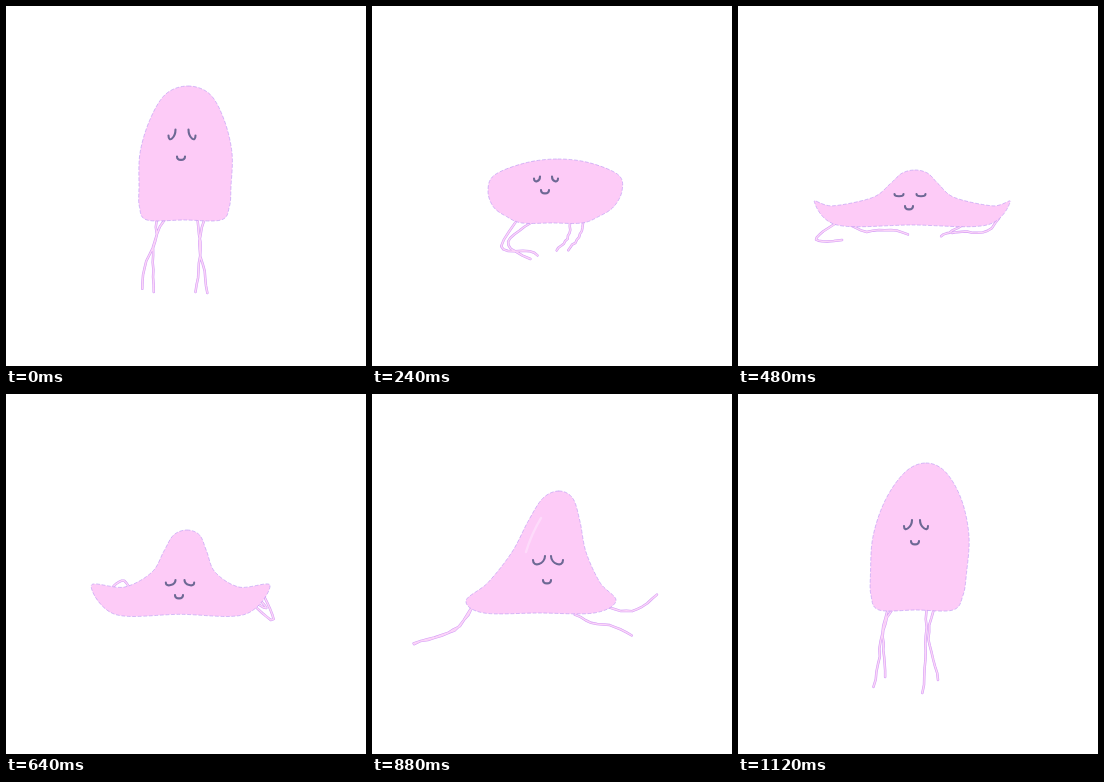
Write an HTML page that moves like this. It is 360 px wide and 360 px high and loops after 1.2 s.

```html
<!DOCTYPE html>
<html lang="en">
<head>
<meta charset="utf-8">
<title>Jelly hop</title>
<style>
  html, body { margin: 0; width: 100%; height: 100%; overflow: hidden; background: #fff; }
  svg { display: block; width: 100vw; height: 100vh; }
  path { fill: none; stroke-linecap: round; stroke-linejoin: round; }
  #body { fill: #fdcbf7; stroke: #b795f3; stroke-width: .6; stroke-dasharray: 3 2.5; }
  #legEdge { stroke: #d29df6; stroke-width: 2.5; }
  #legCore { stroke: #fcd5f8; stroke-width: 1.4; }
  #face { stroke: #6d6894; stroke-width: 2.1; }
  #shine { stroke: #fddbfa; stroke-width: 2.4; }
</style>
</head>
<body>
<svg viewBox="0 0 360 360">
  <path id="legEdge"/>
  <path id="legCore"/>
  <path id="body"/>
  <path id="shine" d="M154 158Q159 141 169 124"/>
  <path id="face"/>
</svg>
<script>
const STEP = 80, COUNT = 15, SHINE_STEP = 11;
const LEVELS = [.06, .25, .5, .75, .9, 1];   // heights at which the half widths are given
const LIFT = [0, 0, 0, .3, 1, 0];            // how far a raised fin pulls each level up
const LEG_PARTS = 10;

// crown and base: [x, y]. Leg: root x, y, tip x, y, bend, wave.
// face: x, y, half eye gap, eye width, eye depth, eye tilt, mouth drop.
const poses = [
  { step: 0, crown: [182, 80], base: [178, 214], fin: 0, half: [22, 37, 46, 46, 45, 37],
    legs: [[150, 214, 137, 283, 0, -3], [158, 214, 148, 286, 6, 1],
           [191, 214, 189, 286, -4, 0], [199, 214, 201, 287, 5, 2]],
    face: [176, 126.5, 10, 7, 8, 6, 24] },
  { step: 2, crown: [184, 132], base: [174, 216], fin: 0, half: [42, 56, 57, 52, 47, 42],
    legs: [[144, 214, 131, 252, 2, 14], [156, 214, 162, 252, 9, 0],
           [190, 217, 178, 248, -9, 0], [201, 217, 209, 252, 5, 7]],
    face: [176, 150, 12, 7, 5, 6, 20] },
  { step: 3, crown: [186, 153], base: [180, 217], fin: 0, half: [32, 62, 67, 60, 46, 30],
    legs: [[144, 216, 166, 249, 22, 8], [158, 217, 159, 253, 22, -2],
           [198, 217, 184, 244, -5, 0], [212, 215, 196, 244, -3, 0]],
    face: [174, 171.5, 9, 6, 5, 2, 12.5] },
  { step: 6, crown: [177, 164], base: [174, 219], fin: 18, half: [13, 24, 41, 80, 98, 75],
    legs: [[98, 217, 104, 234, 24, 0], [112, 219, 170, 228, 1, 3],
           [230, 216, 203, 230, -1, 0], [261, 212, 214, 227, -8, -3]],
    face: [172, 188, 11, 9, 3, 0, 12] },
  { step: 9, crown: [183, 122], base: [174, 221], fin: 22, half: [13, 20, 27, 46, 85, 60],
    legs: [[88, 197, 96, 190, -28, 0], [97, 189, 104, 189, -22, 0],
           [254, 189, 261, 190, -32, 0], [256, 196, 262, 201, -34, 0]],
    face: [175, 187, 8.5, 10, 6, 4, 14.5] },
  { step: 11, crown: [187, 97], base: [167, 219], fin: 0, half: [15, 26, 37, 56, 75, 55],
    legs: [[100, 213, 42, 250, -9, -2], [100, 213, 42, 250, -9, -2],
           [231, 211, 285, 201, 11, 0], [203, 220, 260, 241, 0, 2]],
    face: [176, 164, 9, 12, 8, 4, 22] },
  { step: 14, crown: [188, 69], base: [178, 216], fin: 0, half: [20, 38, 48, 48, 46, 37],
    legs: [[150, 217, 136, 293, 1, 1], [153, 217, 147, 283, 5, 2],
           [188, 217, 185, 299, -1, 0], [196, 217, 200, 286, 6, 2]],
    face: [178, 129, 8, 8, 7, 6, 18] }
];

const lerp = (a, b, u) => a + (b - a) * u;
const mix = (a, b, u) => Array.isArray(a) ? a.map((v, i) => mix(v, b[i], u)) : lerp(a, b, u);

function poseAt(step) {
  const i = poses.findIndex(p => p.step >= step);
  const b = poses[i], a = poses[Math.max(0, i - 1)];
  const u = b === a ? 0 : (step - a.step) / (b.step - a.step);
  return Object.fromEntries(Object.keys(a).map(key => [key, mix(a[key], b[key], u)]));
}

// Repeatable noise from -1 to 1.
function noise(seed) {
  const n = Math.sin(seed * 12.9898) * 43758.5453;
  return (n - Math.floor(n)) * 2 - 1;
}

// Closed smooth curve through every point.
function closedSpline(points) {
  const n = points.length, at = i => points[(i + n) % n];
  const handle = (i, sign) => at(i).map((v, c) =>
    (v + sign * (at(i + 1)[c] - at(i - 1)[c]) / 6).toFixed(2));
  return 'M' + at(0) + points.map((_, i) =>
    `C${handle(i, 1)} ${handle(i + 1, -1)} ${at(i + 1)}`).join('') + 'Z';
}

function bodyPath({ crown, base, fin, half }) {
  const side = sign => LEVELS.map((level, i) => {
    const [x, y] = mix(crown, base, level);
    return [x + sign * half[i], y - fin * LIFT[i]];
  });
  return closedSpline([crown, ...side(1), base, ...side(-1).reverse()]);
}

function legPath([x0, y0, x1, y1, bend, wave], seed) {
  const dx = x1 - x0, dy = y1 - y0, length = Math.hypot(dx, dy);
  const points = [];
  for (let i = 0; i <= LEG_PARTS; i++) {
    const u = i / LEG_PARTS;
    const off = bend * Math.sin(Math.PI * u) + wave * Math.sin(2 * Math.PI * u)
              + .8 * noise(seed + i);
    points.push([lerp(x0, x1, u) - dy / length * off, lerp(y0, y1, u) + dx / length * off]);
  }
  return 'M' + points.join('L');
}

// A small U whose right end is raised by the tilt.
function cup(x, y, width, depth, tilt) {
  const l = x - width / 2, r = x + width / 2, ly = y + tilt / 2, ry = y - tilt / 2;
  return `M${l} ${ly}C${l} ${ly + depth} ${r} ${ry + depth} ${r} ${ry}`;
}

function facePath([x, y, gap, width, depth, tilt, drop]) {
  return cup(x - gap, y, width, depth, tilt) + cup(x + gap, y, width, depth, -tilt)
       + cup(x - 1, y + drop, 8, 4.5, 0);
}

const el = id => document.getElementById(id);
let shown = -1;

function draw(step) {
  if (step === shown) return;
  shown = step;
  const pose = poseAt(step);
  const legs = pose.legs.map((leg, i) => legPath(leg, step * 50 + i * 12)).join('');
  el('legEdge').setAttribute('d', legs);
  el('legCore').setAttribute('d', legs);
  el('body').setAttribute('d', bodyPath(pose));
  el('face').setAttribute('d', facePath(pose.face));
  el('shine').style.opacity = step === SHINE_STEP ? 1 : 0;
}

const start = performance.now();
function tick() {
  draw(Math.floor((performance.now() - start) / STEP) % COUNT);
  requestAnimationFrame(tick);
}
tick();
</script>
</body>
</html>
```
